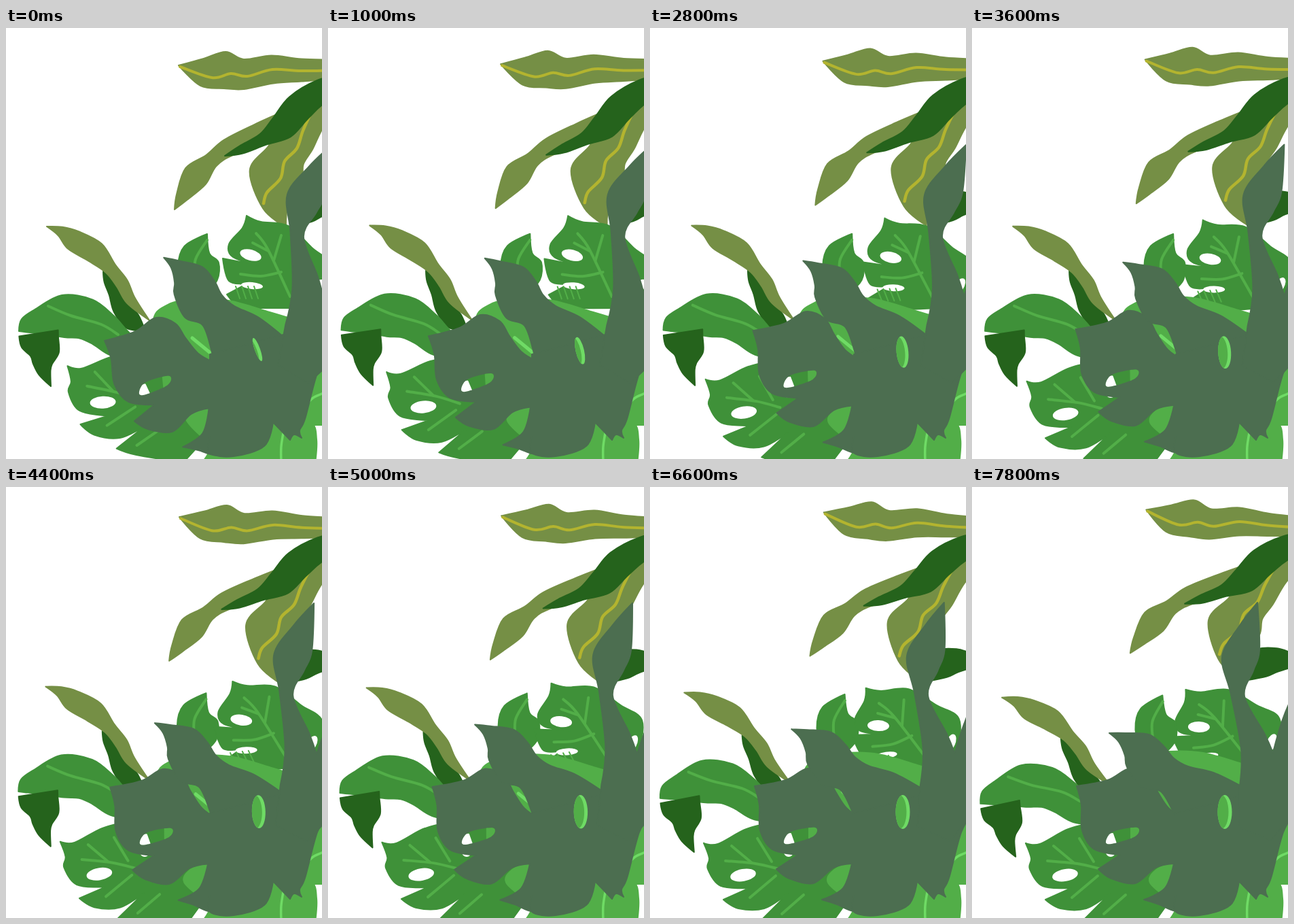
Recreate the animation shown at these times as an HTML page with a canvas. Size 465 px wide and 634 px high, loop 8000 ms.

```html
<!DOCTYPE html>
<html lang="en">
<head>
<meta charset="utf-8">
<title>Swaying leaves</title>
<style>
html, body { margin: 0; width: 100%; height: 100%; overflow: hidden; background: #fff; }
canvas { display: block; }
</style>
</head>
<body>
<canvas id="stage" width="465" height="634"></canvas>
<script>
const ctx = document.getElementById('stage').getContext('2d');
const OLIVE = '#758f45', YELLOW = '#b3b42f', DARK = '#25631c', MID = '#3f9139',
      LIGHT = '#52ae48', BRIGHT = '#6fdb65', SLATE = '#4c6e50', WHITE = '#fff';
const LOOP = 8000, STEP = 200;

const smooth = u => u * u * (3 - 2 * u);

// Points are "x,y"; a trailing * makes a sharp corner.
const parse = text => text.trim().split(/\s+/).map(token => {
  const [x, y, width] = token.replace('*', '').split(',').map(Number);
  return { x, y, width, sharp: token.endsWith('*') };
});

// Smooth curve through all points.
function trace(points, closed) {
  const n = points.length;
  const at = i => points[closed ? (i + n) % n : Math.max(0, Math.min(n - 1, i))];
  const handle = (i, side) => {
    const p = at(i), a = at(i - 1), b = at(i + 1), s = p.sharp ? 0 : side / 6;
    return [p.x + (b.x - a.x) * s, p.y + (b.y - a.y) * s];
  };
  const path = new Path2D();
  path.moveTo(points[0].x, points[0].y);
  for (let i = 0; i < (closed ? n : n - 1); i++) {
    path.bezierCurveTo(...handle(i, 1), ...handle(i + 1, -1), at(i + 1).x, at(i + 1).y);
  }
  return path;
}

function paint(color, path) {
  ctx.fillStyle = ctx.strokeStyle = color;
  ctx.lineWidth = 2;
  ctx.lineJoin = 'round';
  ctx.fill(path);
  ctx.stroke(path);
}

const fill = (color, outline) => paint(color, trace(parse(outline), true));

// A ribbon leaf: spine points "x,y,halfWidth" widened to both sides.
function blade(color, spine) {
  const points = parse(spine), last = points.length - 1;
  const side = sign => points.map((p, i) => {
    const a = points[Math.max(0, i - 1)], b = points[Math.min(last, i + 1)];
    const angle = Math.atan2(b.y - a.y, b.x - a.x);
    return {
      x: p.x - Math.sin(angle) * p.width * sign,
      y: p.y + Math.cos(angle) * p.width * sign,
      sharp: i === 0 || i === last
    };
  });
  paint(color, trace([...side(-1), ...side(1).reverse()], true));
}

function veins(color, width, ...lines) {
  ctx.strokeStyle = color;
  ctx.lineWidth = width;
  ctx.lineCap = 'round';
  for (const line of lines) ctx.stroke(trace(parse(line), false));
}

function oval(color, x, y, rx, ry, degrees = 0) {
  ctx.fillStyle = color;
  ctx.beginPath();
  ctx.ellipse(x, y, rx, ry, degrees * Math.PI / 180, 0, 7);
  ctx.fill();
}

function turned(x, y, degrees, draw) {
  ctx.save();
  ctx.translate(x, y);
  ctx.rotate(degrees * Math.PI / 180);
  ctx.translate(-x, -y);
  draw();
  ctx.restore();
}

function topLeaves() {
  blade(OLIVE, '254,55,0 288,65,20 322,62,27 350,68,22 392,61,20.5 435,62,16.5 490,61,14 530,62,12');
  veins(YELLOW, 4, '256,57 303,73 331,67 355,71 392,61 435,63 500,62');
  blade(OLIVE, '412,293,0 397,262,19 397,217,39 412,187,29 426,162,30 450,128,24 485,90,20');
  veins(YELLOW, 4.5, '379,258 384,242 404,221 410,196 428,177 437,151 451,122 468,106');
  blade(OLIVE, '248,267,0 259,248,9 279,218,19 302,195,11 327,176,13 375,155,16 410,122,0');
  blade(DARK, '322,188,0 346,179,6 378,164,9 406,146,19 431,117,21 466,92,17 525,70,12');
  blade(DARK, '421,293,0 438,268,21 465,259,17 500,258,5');
}

function leftLeaves() {
  blade(DARK, '143,358,0 150,371,6 160,389,9 170,411,13 186,432,13 205,446,0');
  blade(OLIVE, '60,292,0 80,299,7 99,312,15 131,330,16 154,354,9 171,376,9 184,401,7 211,430,0');
  blade(MID, '19,446,0 28,438,11 46,432,18 84,424,31 118,428,30 143,444,26 166,463,22 200,480,10');
  veins(LIGHT, 4, '62,409 95,423 140,436 165,451');
  blade(DARK, '48,449,29 50,462,28 57,480,21 54,494,14 57,507,9 66,527,0');
  blade(MID, '296,303,0 281,326,19 283,348,30 286,375,25 290,392,0');
  veins(LIGHT, 4, '296,312 279,340 278,366');
}

function upperLeaf() {
  fill(MID, `354,276* 375,285 415,291 450,323 478,350 464,398 440,412* 340,412* 325,392*
    355,376* 328,372 319,339* 345,344 372,349* 334,337 328,318 348,294`);
  oval(WHITE, 360, 334, 16, 8, 15);
  oval(WHITE, 362, 379, 16, 5, 5);
  oval(WHITE, 458, 382, 7, 14, 36);
  veins(LIGHT, 4, '368,302 385,325 418,395', '363,316 386,328', '405,305 394,342', '345,362 375,365 405,359');
  for (let x = 338; x < 370; x += 9) veins(LIGHT, 2, `${x},380 ${x + 6},398`);
}

function backLeaf() {
  fill(LIGHT, '228,425 250,397 290,389 340,391 400,408 440,420* 440,560* 240,520*');
  veins(BRIGHT, 5, '286,446 314,469');
}

function lowLeaf() {
  fill(MID, `79,524* 100,525 142,503 175,500 200,535* 300,555* 290,610* 265,645* 195,642 165,636*
    203,598* 168,620 130,620 108,607* 146,590* 104,587 85,562 87,546`);
  oval(WHITE, 137, 571, 19, 9, -10);
  veins(LIGHT, 4, '111,550 155,554 190,562', '120,528 150,553', '158,517 179,551',
    '147,604 185,572', '194,628 226,600');
  fill(LIGHT, '300,550* 270,564 262,582 290,606*');
}

function bottomLeaf() {
  fill(LIGHT, '400,550* 297,600* 300,620 288,640* 455,640* 457,605 448,578');
  fill(LIGHT, '400,470* 470,470* 470,584* 400,584*');
  veins(BRIGHT, 3.5, '405,640 405,615 410,585', '440,556 452,544 470,536');
}

function leftLobe() {
  fill(SLATE, `154,440* 200,431 232,414 260,425 273,448 289,472 310,487* 340,520* 330,620* 300,624
    275,614 253,607* 284,590 297,554* 270,560 240,583 205,576 186,562* 218,541* 180,533 162,505 161,468`);
  ctx.save();
  ctx.clip(trace(parse('197,521 208,507 243,501 240,514 205,525'), true));
  fill(MID, '190,490* 250,490* 250,540* 190,540*');
  fill(LIGHT, '234,490* 250,490* 250,540* 234,540*');
  fill(WHITE, '190,512* 207,510* 214,530* 190,530*');
  ctx.restore();
}

function topLobe() {
  fill(SLATE, `202,362* 225,362 260,364 282,381 297,399 318,411 355,420 396,440* 400,520* 310,510*
    298,482 278,448 250,442 228,412 225,395 216,375`);
}

function tallLeaf() {
  fill(SLATE, `420,170* 393,205 368,250 381,305 396,385 394,440* 392,500* 440,520* 520,420* 520,220*
    465,322 443,391* 430,362 401,308 414,270 423,240`);
}

function heart() {
  fill(SLATE, `300,480* 300,600* 300,625 335,630 380,615 393,580* 418,606* 424,598 435,603* 432,592
    440,575 458,508 475,480* 475,430* 412,450*`);
}

function eyelet(open) {
  turned(370 + 2 * open, 473 + 5 * open, -20 * (1 - open), () => {
    const x = 370 + 2 * open, y = 473 + 5 * open, rx = 4 + 6.5 * open, ry = 18 + 7 * open;
    oval(BRIGHT, x, y, rx, ry);
    ctx.clip();
    oval(LIGHT, x - 5, y, rx, ry);
  });
}

function draw(time) {
  const u = time / (LOOP - STEP);
  const top = u ** 1.2, left = u * (1.9 * u - .9), upper = smooth(u ** 1.2);
  const low = 1 - (1 - u) ** 3, front = u ** 1.5;

  ctx.clearRect(0, 0, 465, 634);
  turned(514, 73, 4.75 * top, topLeaves);
  turned(345, 565, -3.45 * left, leftLeaves);
  turned(426, 452, -13.7 * upper, upperLeaf);
  ctx.save();
  ctx.translate(-12 * (1 - front), 10 * (1 - front));
  backLeaf();
  ctx.restore();
  turned(312, 608, 6.75 * (1 - low), lowLeaf);
  bottomLeaf();

  oval(WHITE, 204, 537, 7, 7);
  turned(350, 540, -5.7 * (1 - low), leftLobe);
  turned(337, 500, 11.5 * (1 - front), topLobe);
  heart();
  turned(425, 553, 8.6 * (1 - front), tallLeaf);
  eyelet(low);
}

function tick() {
  draw(Math.floor(performance.now() % LOOP / STEP) * STEP);
  requestAnimationFrame(tick);
}
tick();
</script>
</body>
</html>
```
